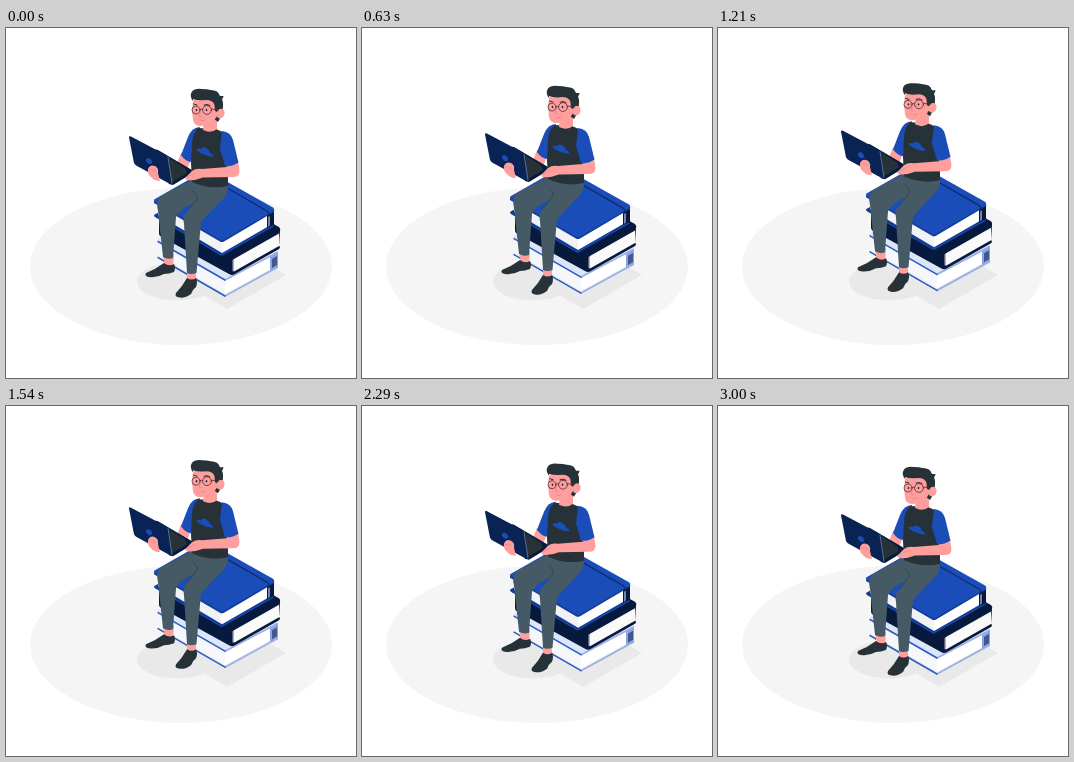
An HTML page for the animation above (3.04 s loop, 350 px wide and 350 px high).

```html
<!DOCTYPE html>
<html lang="en">
<head>
<meta charset="utf-8">
<title>Reading on books</title>
<style>
html, body { margin: 0; width: 100%; height: 100%; overflow: hidden; background: #fff; }
svg { display: block; width: 100vw; height: 100vh; }
.skin { fill: #ff9f9d; }
.ink { fill: #263238; }
.blue { fill: #1b4db8; }
.navy { fill: #071a3d; }
.pants { fill: #455a64; }
.line { fill: none; stroke-linecap: round; stroke-linejoin: round; }
</style>
</head>
<body>
<svg viewBox="0 0 350 350">
  <ellipse cx="175" cy="238.5" rx="151" ry="78.5" fill="#f5f5f5"/>
  <g fill="#e9e9e9">
    <ellipse cx="171" cy="253.5" rx="40" ry="19"/>
    <path d="M150 239L221 281 280 247 212 207Z"/>
  </g>

  <g id="float">
    <!-- bottom book -->
    <path d="M152 211L205 183 271 222Q273 225 271 227L221 254Q219 255 217 254L152 215Z" fill="#dde5f8"/>
    <path d="M153 215L219 253V266L153 228Z" fill="#f5f7fb"/>
    <path d="M219 253L268 225V239L219 266Z" fill="#fff"/>
    <path d="M264 228L272 224V240L264 243Z" fill="#8ba3e3"/>
    <path d="M266 231L271 228V237L266 240Z" fill="#41578f"/>
    <path class="line" d="M219 252L271 224.5M219 268L271 239.5" stroke="#9bafe6" stroke-width="1.8"/>
    <path class="line" d="M152 213.5L219 252M152 229.5L219 268" stroke="#2c5ac6" stroke-width="1.5"/>

    <!-- middle book -->
    <path class="navy" d="M153 191L205 163 273 199Q275 201 274 203L273 218Q275 219 273 221L229 246Q226 248 223 246L154 208Q153 207 153 205Z"/>
    <path d="M228 231L273 205.5V218L228 243.500Z" fill="#fafafa"/>
    <path d="M226.500 232L228 231V243.500L226.500 243Z" fill="#a9b0bd"/>

    <!-- top book -->
    <path d="M148 187L200 157 268 195Q269 197 267 199L218 227Q216 228 214 227L149 189Z" fill="#0f388f"/>
    <path d="M152 175L216 212V225L152 187Z" fill="#f1f2f5"/>
    <path d="M216 212L263 185V198L216 225Z" fill="#fff"/>
    <path class="navy" d="M261 187L268 183V197L261 200Z"/>
    <path d="M262 189L264 188V197.500L262 199Z" fill="#7184b3"/>
    <path d="M148 173V175L214 213.500Q216 214.500 218 213.500L267 184.500Q269 183 268 181Z" fill="#123c98"/>
    <path class="blue" d="M149 174Q147 172 149 171L198 143Q200 142 202 143L267 179.500Q269 181 267 183L218 211.500Q216 212.500 214 211.500Z"/>
    <path class="line" d="M195 145L261 183Q264 185 262 187" stroke="#0d2c72" stroke-width="1.4"/>
    <path class="line" d="M148.500 188L215 227 267 198" stroke="#1b4db8" stroke-width="1"/>

    <!-- feet -->
    <path class="skin" d="M157 226H168L167 239 159 240ZM181 241H190L190 254 181 255Z"/>
    <path class="ink" d="M158 235Q163 239 168 236Q170 240 168 244Q163 246 158 246Q151 250 143 249Q138 248 140 245Q150 241 158 235Z"/>
    <path class="ink" d="M181 250Q186 253 190 250Q192 254 190 259Q187 261 185 266Q180 270 174 269.600Q168 269 170 265Q176 259 181 250Z"/>

    <!-- legs -->
    <path class="pants" d="M187 151L205 156 190 174Q174 180 170 189L167 230Q162 232 157 229L152 183Q149 172 157 167Z"/>
    <path class="pants" d="M187 152L222 155Q224 166 212 176L195 194 190.500 245Q185 247 181 245L178 196Q176 188 182 183L191 172Z"/>
    <path class="line" d="M187 163Q192 166 191 171L182 182" stroke="#37474f" stroke-width="1"/>

    <!-- far arm and laptop -->
    <path class="skin" d="M175 125L185 131 181 142 170 138Z"/>
    <path class="blue" d="M194 99Q186 99 182 109L175 127Q179 133 185 134L190 121Z"/>
    <path class="navy" d="M149 122.500Q150 121 152 122L186 142Q188 144 186 145.500L167 157 163 156Z"/>
    <path class="ink" d="M163 130L179 140 181 145 166 154Z"/>
    <path d="M123 109.500Q123 107.500 125 108.500L159 126.500Q161 127.500 162 129.500L166 155Q166 157 164 156L131 138Q129 137 128 135Z" fill="#0a2355"/>
    <path class="line" d="M162 129L166 155" stroke="#8494b5" stroke-width=".7"/>
    <ellipse cx="143" cy="133" rx="3.400" ry="2.400" transform="rotate(40 143 133)" fill="#1b4db8"/>
    <path class="skin" d="M142 141Q144 136 149 138Q153 140 152 145L154 153Q148 153 145 149Q141 146 142 141Z"/>
    <path class="line" d="M143 142Q147 140 150 143" stroke="#e47f80" stroke-width=".6"/>

    <!-- torso -->
    <path class="ink" d="M192 100Q186 106 186 116L185 135 186 154Q203 162 222 158L222 136Q223 112 219 105L210 101Z"/>
    <path class="skin" d="M219 133H232L233.500 143Q233.500 149 227 149L197 149.500Q188 153 181 152Q178 151 181 148L186 143Q190 140 196 141L221 139Z"/>
    <path class="blue" d="M216 103Q225 104 227 112L232.500 134.500Q226 139 219 138L214 121Z"/>
    <path class="line" d="M181 149L189 145" stroke="#e47f80" stroke-width=".6"/>
    <g class="blue" transform="rotate(22 199 123)">
      <ellipse cx="199.500" cy="124.500" rx="9" ry="2.200"/>
      <path d="M194 124Q194 119.500 199 120Q204 120.500 204 124Z"/>
    </g>

    <!-- head -->
    <path class="skin" d="M198 93L211 88 211 101Q205 106 197 102Z"/>
    <path d="M198 97Q205 96 209 91L198 95Z" fill="#e98283"/>
    <path class="ink" d="M207 70H216Q219 85 212 94L208 91Z"/>
    <path class="skin" d="M188 70Q185 78 187 92Q188 98 195 98Q207 97 211 88L212 73 204 68Z"/>
    <ellipse class="skin" cx="214.500" cy="85.500" rx="4" ry="5" transform="rotate(18 214.500 85.500)"/>
    <path class="ink" d="M187 73Q183 68 186 63.500Q189 60 196 61Q206 61.500 211 63.500Q213 65 214 68L217.500 68Q217.500 70 215.500 71.500Q218 75 216.500 81Q213 79 211 84L209 83 208.500 77Q207 72 200 72Q193 73 187 71Z"/>
    <g class="line" stroke="#4f2c34" stroke-width=".8">
      <circle cx="190" cy="82" r="4"/>
      <circle cx="201" cy="82" r="4.400"/>
      <path d="M194 81.500Q195.300 80.500 196.600 81.500M205.400 81L212 82"/>
    </g>
    <g class="ink">
      <ellipse cx="190.500" cy="82" rx=".8" ry="1.200"/>
      <ellipse cx="200.500" cy="82" rx=".8" ry="1.200"/>
    </g>
    <path class="line" d="M187.500 76L191 77M198 77Q201 75.500 204 77.500" stroke="#263238" stroke-width="1"/>
    <path class="line" d="M194.500 83L193 88 195 88.500M195 92.500Q197 93.500 199 92" stroke="#e26e70" stroke-width=".6"/>
  </g>
</svg>
<script>
const LOOP = 3040, HALF = 1500, RISE = 7;
const figure = document.getElementById('float');

function draw(now) {
  const t = now % LOOP;
  const lift = RISE * Math.max(0, 1 - Math.abs(t / HALF - 1));
  figure.setAttribute('transform', `translate(0 ${-lift})`);
  requestAnimationFrame(draw);
}
draw(performance.now());
</script>
</body>
</html>
```
